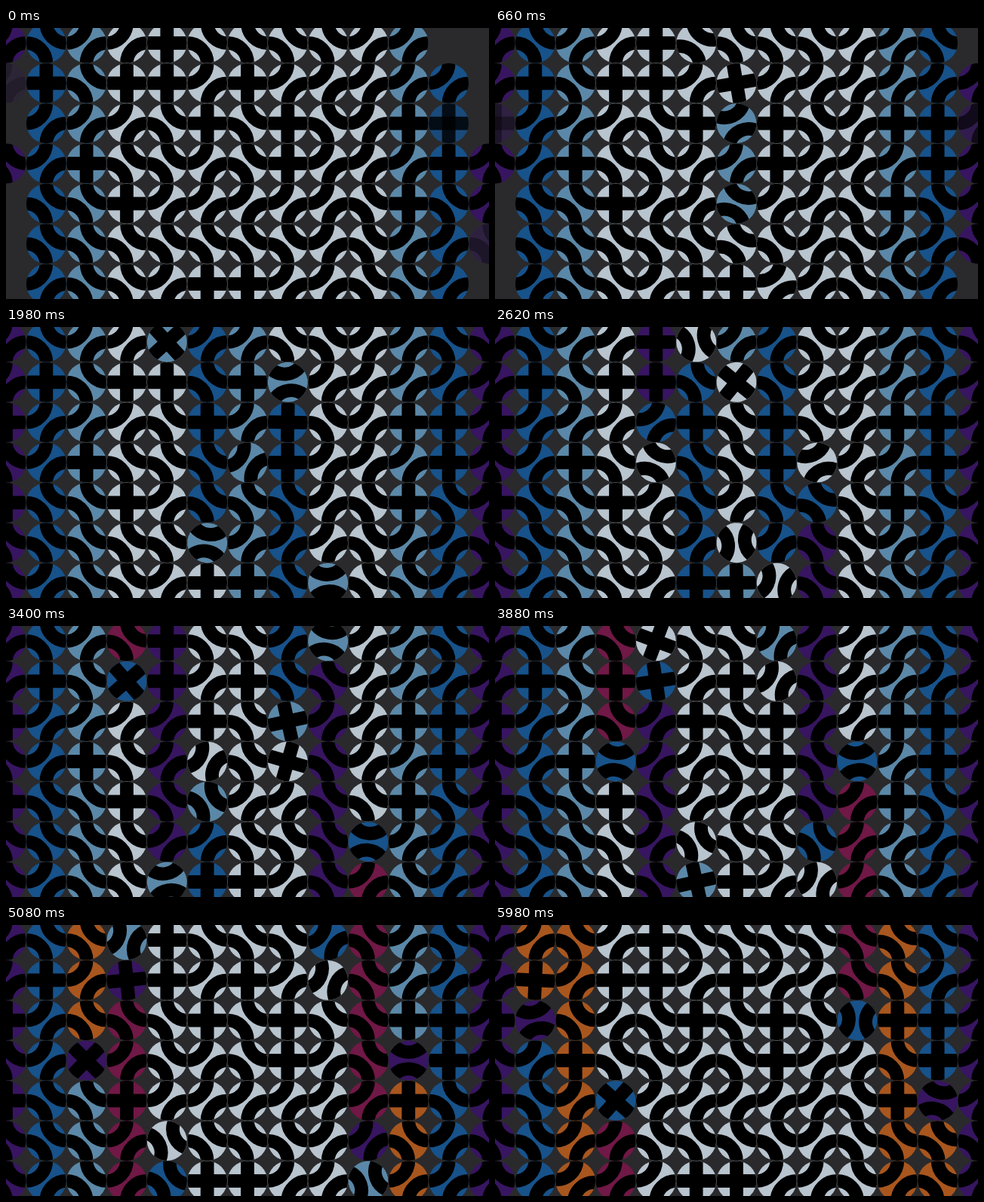
An HTML page with a canvas that plays this animation: 640x360 px, repeating every 6 s.

```html
<!DOCTYPE html>
<html>
<head>
<meta charset="utf-8">
<style>
  html, body { margin: 0; width: 100%; height: 100%; overflow: hidden; background: #2a2a2c; }
  canvas { display: block; }
</style>
</head>
<body>
<canvas id="stage" width="640" height="360"></canvas>
<script>
const ctx = document.getElementById('stage').getContext('2d');
const LOOP = 6000, SIZE = 160 / 3, HALF = SIZE / 2, BAR = SIZE / 3, SPIN = 500;
const PALETTE = ['#b8c4ce', '#5b88a8', '#17528a', '#371560', '#701846', '#a8561e'];

// A: arcs round top left and bottom right, B: the mirrored tile, +: crossing
const TILES = [
  'ABAA+BBBBAABB',
  'A+B++A+AAAAAA',
  '+AAAB+B+BA++A',
  'BA+BBAB+AAA+A',
  '+BB+AAAAAB+BA',
  'BBBBBBBBABAAB',
  'BABBA++AABBAA'
];

// Start times of the tiles that are still fading in, by "column,row"
const LATE = {
  '11,2': -330, '11,0': 100, '0,1': -80, '0,2': 500, '0,4': 1240, '0,5': 700, '0,6': 900,
  '12,0': 1260, '12,1': 200, '12,2': 400, '12,5': -150, '12,6': 850
};

const clamp = x => Math.max(0, Math.min(1, x));
const spin = (t, middle) => (1 - Math.cos(Math.PI * clamp((t - middle) / SPIN + 0.5))) / 2;

function arc(x, y) {
  ctx.beginPath();
  ctx.arc(x, y, HALF, 0, Math.PI * 2);
  ctx.stroke();
}

function drawTile(col, row, t) {
  const type = TILES[row][col];
  const dist = Math.abs(col - 6);
  const step = 240 * (dist ? (col < 6 ? row : 6 - row) : Math.abs(row - 3));
  const out = spin(t, step + (dist ? 805 + 1185 * (dist - 1) : 325));
  const back = spin(t, step + (dist ? 2570 + 1220 * (dist - 1) : 2120));

  // Colours step through the palette, then return to the lightest
  const from = Math.max(0, dist - 3);
  const peak = Math.min(5, dist + 1);
  const shade = (from + (peak - from) * out) * (1 - back);
  const turn = out + back;
  const angle = type === 'A' ? turn : 1 - turn;

  const start = LATE[col + ',' + row];
  ctx.save();
  ctx.globalAlpha = start === undefined ? 1 : clamp((t - start) / 400);
  ctx.translate(col * SIZE, 180 + (row - 3) * SIZE);
  ctx.rotate(angle * Math.PI / 2);
  ctx.beginPath();
  ctx.arc(0, 0, HALF - 0.2, 0, Math.PI * 2);
  ctx.fillStyle = PALETTE[Math.floor(shade + 0.25)];
  ctx.fill();
  ctx.clip();
  ctx.fillStyle = ctx.strokeStyle = '#000';
  ctx.lineWidth = BAR;
  if (type === '+') {
    ctx.fillRect(-HALF, -BAR / 2, SIZE, BAR);
    ctx.fillRect(-BAR / 2, -HALF, BAR, SIZE);
  } else {
    arc(-HALF, -HALF);
    arc(HALF, HALF);
  }
  ctx.restore();
}

function draw(now) {
  const t = now % LOOP;
  ctx.fillStyle = '#2a2a2c';
  ctx.fillRect(0, 0, 640, 360);
  for (let row = 0; row < 7; row++)
    for (let col = 0; col < 13; col++) drawTile(col, row, t);
}

const begin = performance.now();
function frame() {
  draw(performance.now() - begin);
  requestAnimationFrame(frame);
}
frame();
</script>
</body>
</html>
```
